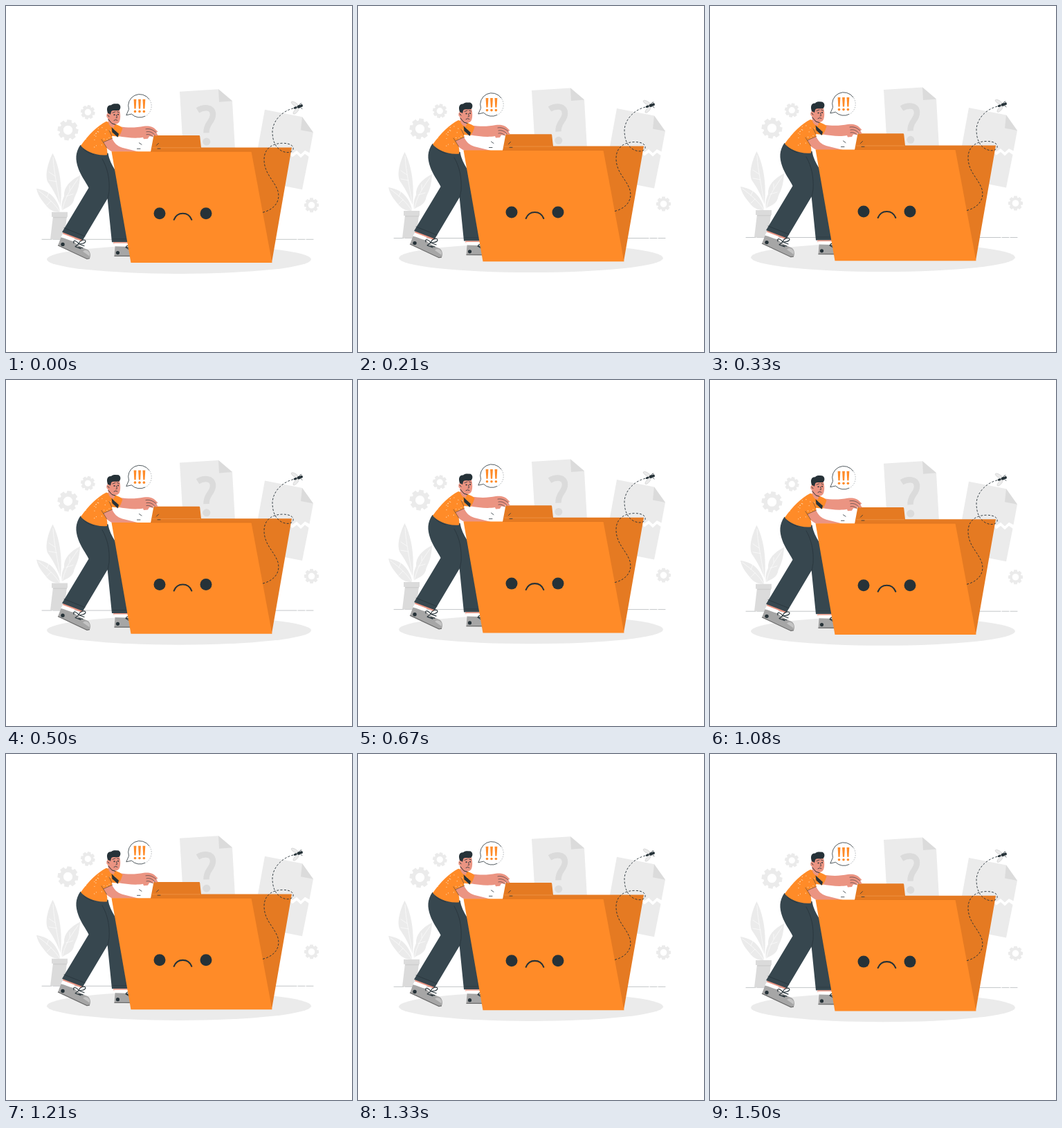
These frames come from a looping animation (500x500 px, 1540 ms). An HTML page:

```html
<!DOCTYPE html>
<html lang="en">
<head>
<meta charset="utf-8">
<title>Sad folder</title>
<style>
  html, body { margin: 0; width: 100%; height: 100%; overflow: hidden; background: #fff; }
  svg { display: block; width: 100vw; height: 100vh; }
  .pale { fill: #ebebeb; }
  .grey { fill: #dbdbdb; }
  .ink { fill: #263238; }
  .skin { fill: #eb9482; }
  .cloth { fill: #37474f; }
  .front { fill: #ff8b28; }
  .back { fill: #e57a22; }
  .line { fill: none; stroke: #263238; stroke-width: .8; stroke-linecap: round; stroke-linejoin: round; }
  .vein { fill: none; stroke: #fff; stroke-width: .6; stroke-linecap: round; }
</style>
</head>
<body>
<svg viewBox="0 0 500 500" xmlns="http://www.w3.org/2000/svg">
  <defs>
    <clipPath id="shirtClip"><use href="#shirt"/></clipPath>
  </defs>
  <g id="scene">
    <ellipse class="pale" cx="250" cy="366.3" rx="191" ry="20.8"/>
    <path class="line" d="M52 337.5H66M68 337.5H420M422 337.5H432M434 337.5H444" style="stroke-width:.5" opacity=".55"/>

    <g id="gears" class="pale" fill-rule="evenodd"></g>

    <!-- papers -->
    <path class="pale" d="M251 124L307 120.5L327 137.5L331 208H256Z"/>
    <path class="grey" d="M307 120.5L308 139L327 137.5Z"/>
    <path d="M277 151C285 146 299 145 299 157C299 168 289 169 289.5 183.5" fill="none" stroke="#dbdbdb" stroke-width="8.5"/>
    <circle class="grey" cx="289.8" cy="196.3" r="5.5"/>
    <path class="pale" d="M374 150L428 160.5L444 183L438.5 212.5L432 209L426 214.5L420 209L414 213.5L407 208L364 205Z"/>
    <path class="grey" d="M428 160.5L426 179.5L444 183Z"/>
    <path class="pale" d="M408 213L414 218.5L420 214L426 219.5L432 214L437.5 218L428 265.5L395 259Z"/>

    <!-- plant -->
    <g class="pale">
      <path d="M67.5 213C58 232 56 250 62 257C66 263 72 272 79 290C81 268 80 238 67.5 213Z"/>
      <path d="M107 245C93 252 83 262 84 275C80 283 80 290 81 296C86 291 95 291 98 281C99 274 106 268 107 245Z"/>
      <path d="M44 264C47 278 55 284 59 290C65 297 72 298 78 298C78 288 70 277 64 272C57 267 50 265 44 264Z"/>
    </g>
    <path class="vein" d="M68 219C69 242 76 268 79.500 298M104 250C93 266 84 278 81 298M47 267C59 276 71 286 78 298M71 246L62 240M73 254L62 252M92 267V260M87 275L97 272M59 277L62 270M65 282L59 288"/>
    <path class="grey" d="M68 304H88L84 337.500H64ZM66 298H89V305H66Z"/>
    <path fill="#cfcfcf" d="M68 305H88V306.500H68Z"/>

    <!-- folder back -->
    <path class="back" d="M213.500 187.200H279Q280 187.200 280.200 188.200L282 204.600H413L384 371L180 300L209 211Z"/>
    <path d="M211 205H281" fill="none" stroke="#f39a4c" stroke-width=".7"/>

    <!-- far leg -->
    <path class="cloth" d="M142 212L147.500 213.500C149 222 153 230 158 238L178 341.500H153L146 272Z"/>
    <path class="skin" d="M155 341.500H178V345H156Z"/>
    <path fill="#fff" d="M156 343H180V350H157Z"/>
    <path fill="#a6a6a6" d="M157.500 347.500L174 348L186 350V362.500L156.500 362Z"/>
    <path d="M156.500 361.500H186" stroke="#6f6f6f" stroke-width="1.300"/>
    <circle class="ink" cx="161.500" cy="356.800" r="2.600"/>
    <path class="line" d="M173 349C176 344 181 346 177 349L173 349L178 352" style="stroke-width:1.100"/>
    <path class="line" d="M154 337H176" style="stroke-width:.500"/>

    <!-- near leg -->
    <path class="skin" d="M83 326L112 338L109 340L82 330Z"/>
    <path fill="#fff" d="M82 329.500L99 336L97 343L79 335Z"/>
    <path fill="#a6a6a6" d="M79.500 334.500C85 336 92 339 98 340.500C104 347 113 350 119 353C122 356 123 361 121 365L117 366L75 346.500Z"/>
    <path d="M75 346L117 365.700L121 365" fill="none" stroke="#6f6f6f" stroke-width="1.200"/>
    <path fill="#c4c4c4" d="M111 355C114 352 119 353 121 358L121 362Z"/>
    <circle class="ink" cx="82" cy="344.600" r="2.700"/>
    <path class="line" d="M98 343C96 337 103 340 105 344C107 338 114 337 115 340C115 343 109 344 105 344L113 347M105 344L100 348L108 351M105 349L111 350" style="stroke-width:1.100"/>
    <path class="cloth" d="M107.500 201C100 212 100 222 104.500 235C108 245 115 254 119.500 263L81 327L111 338.500L147 278C151 270 150 258 149 246L147.500 213Z"/>
    <path class="line" d="M139 221C147 235 150 250 149 268L147 279M84 321L114 333M112 207C116 211 121 213 127 215" style="stroke-width:.700"/>

    <!-- arms -->
    <path class="skin" d="M140 195L153 191C156 198 161 203 168 205L192 211H154C147 208 142 203 140 195Z"/>
    <path class="skin" d="M164 174.500C177 176.500 189 176 199 174C207 173 213 175 216 178.500L219.500 182L217 183L219.500 187L216.500 188L212.500 186L214 189L207 188.500L205 192L199 192.500L198 190C188 192 174 190.500 161 188Z"/>
    <path class="line" d="M202 178C208 177 212 179 217 183M203 182C208 181 212 183 215 187M203 186C207 185 210 187 212 189" style="stroke-width:.600"/>

    <!-- shirt -->
    <path id="shirt" class="front" d="M145 167C133 173 119 186 108 202C115 210 129 217 146 215.500C147 211 146 208 145.500 205L141 197L153.500 191.500L153 188L163 189C166 185 167 181 168.500 177C165 173 159 171 154 170Z"/>
    <g id="dots" clip-path="url(#shirtClip)" fill="#ffe0bd"></g>
    <path class="line" d="M141 197L153.500 191.500M153 188L149 180M145.500 205L138 193" style="stroke-width:.500"/>

    <!-- head -->
    <path class="skin" d="M147 160L148 169C150 174 153 176 156 176L158 169Z"/>
    <path class="ink" d="M152.500 175.500L163 185L161.500 190L153.500 182.500Z"/>
    <path class="skin" d="M147 152L163.500 149C165.500 155 166 163 163.500 168C161 172 155 171.500 151 169C148 166 146 159 147 152Z"/>
    <path class="ink" d="M147.500 156C144.500 149 146 143 152 143.500C155 140 160 142 162 141.500C166 143 166.500 148 163.500 151C158 152 154 150 152 153L151 157Z"/>
    <ellipse class="skin" cx="147.800" cy="158.800" rx="2.500" ry="3.300"/>
    <path class="line" d="M147 158L149 160M148 164L153 170L158 171.500" style="stroke-width:1"/>
    <circle class="ink" cx="156.500" cy="157.500" r="1"/>
    <circle class="ink" cx="162" cy="157" r="1"/>
    <path class="line" d="M154 154.500L158 153M160.500 153L163.500 154M159.500 157.500L160.500 161.500L159 162M156 165.500Q159 163.500 161 165.500"/>

    <!-- speech bubble -->
    <path class="line" d="M207 135A16.600 16.600 0 0 0 177.500 149.500L173.800 158L181.500 156.300A16.600 16.600 0 0 0 201 159.500"/>
    <path class="line" d="M208 136.500A16.600 16.600 0 0 1 203 158.500" style="stroke-width:.600" stroke-dasharray=".8 2.500" opacity=".6"/>
    <g id="marks" class="front"></g>

    <!-- folder front -->
    <path class="front" d="M152.500 210.400H354.500L384.500 371.300H180.500Z"/>
    <path d="M209 210.400H355" stroke="#d9711d" stroke-width=".600"/>
    <circle class="ink" cx="222" cy="300" r="8.500"/>
    <circle class="ink" cx="289" cy="300" r="8.500"/>
    <path class="line" d="M242.700 309C247.500 297 263.500 297 268.300 309" style="stroke-width:2.100"/>
    <path class="line" d="M192.500 198L196 200.500M189.500 206.500H194M217.500 201.500L220.500 198.500M219 206.300H223"/>

    <!-- insect -->
    <path class="line" d="M371 298.500C387 294.500 397 283 393 268C388 252 373 243 373 222C373 206 385 198.500 400 198.500C411 198.500 416 202.500 415 207.500C412 213.500 404 212.500 398 209.500C388 203.500 385 193.500 385 181C386 165 400 151 417 147.700" style="stroke-width:.900;stroke-linecap:butt" stroke-dasharray="3 2.200"/>
    <g fill="#ebebeb" stroke="#b5b5b5" stroke-width=".4">
      <ellipse cx="417.500" cy="142" rx="6" ry="2.300" transform="rotate(32 417.500 142)"/>
      <ellipse cx="419" cy="152" rx="5.500" ry="2.200" transform="rotate(-48 419 152)"/>
    </g>
    <g class="ink" transform="rotate(-18 422 146)">
      <ellipse cx="418" cy="146" rx="2.600" ry="1.500"/>
      <ellipse cx="423.500" cy="146" rx="2.800" ry="2.200"/>
      <circle cx="427.200" cy="146" r="2"/>
    </g>
    <path class="line" d="M424 144L425 141.500L427 141M426 147L428 149" style="stroke-width:.700"/>
  </g>
</svg>
<script>
  const NS = "http://www.w3.org/2000/svg";
  const get = id => document.getElementById(id);
  const add = (parent, tag, attrs) => {
    const el = document.createElementNS(NS, tag);
    for (const key in attrs) el.setAttribute(key, attrs[key]);
    parent.appendChild(el);
  };

  function gear(cx, cy, r, hole, turn) {
    const step = Math.PI / 4, pts = [];
    for (let i = 0; i < 8; i++) {
      for (const [off, k] of [[-.31, .79], [-.21, 1], [.21, 1], [.31, .79]]) {
        const a = turn + i * step + off;
        pts.push((cx + r * k * Math.cos(a)).toFixed(2) + " " + (cy + r * k * Math.sin(a)).toFixed(2));
      }
    }
    const ring = `M${cx - hole} ${cy}a${hole} ${hole} 0 1 0 ${2 * hole} 0a${hole} ${hole} 0 1 0 ${-2 * hole} 0Z`;
    add(get("gears"), "path", { d: "M" + pts.join("L") + "Z" + ring });
  }
  gear(118.3, 153.7, 10.5, 4.6, .2);
  gear(89.5, 179.5, 15.2, 6.6, .15);
  gear(441.5, 288, 10.7, 4.8, 0);

  for (const x of [186.5, 193, 199.4]) {
    add(get("marks"), "path", { d: `M${x - 1.9} 135H${x + 1.9}L${x + 1.1} 148.6H${x - 1.1}Z` });
    add(get("marks"), "circle", { cx: x, cy: 152.6, r: 1.8 });
  }

  let seed = 7;
  const rand = () => (seed = seed * 16807 % 2147483647) / 2147483647;
  for (let i = 0; i < 40; i++) {
    add(get("dots"), "circle", { cx: 108 + rand() * 60, cy: 168 + rand() * 48, r: .6 });
  }

  // The whole scene floats up and down at constant speed.
  const LOOP = 1540, LOW = 1490, RISE = 6.5, REST = .2;
  const scene = get("scene");
  function draw(ms) {
    const p = ((ms - LOW + LOOP) % LOOP) / LOOP;
    const lift = RISE * (1 - Math.abs(1 - 2 * p));
    scene.setAttribute("transform", `translate(0 ${(REST - lift).toFixed(3)})`);
  }

  let start = null;
  function tick(now) {
    if (start === null) start = now;
    draw((now - start) % LOOP);
    requestAnimationFrame(tick);
  }
  draw(0);
  requestAnimationFrame(tick);
</script>
</body>
</html>
```
